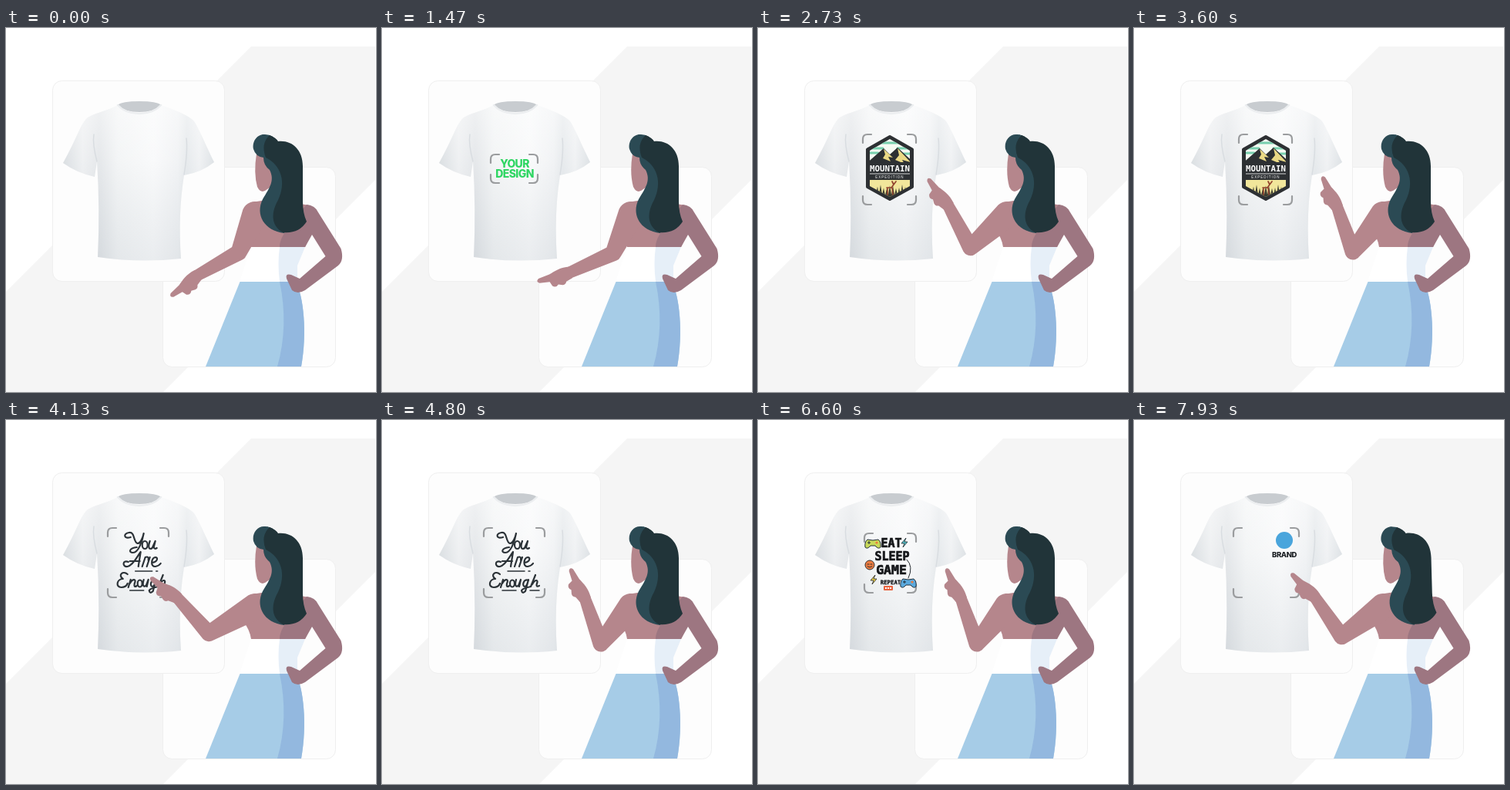
Write an HTML page that moves like this. It is 480 px wide and 472 px high and loops after 8 s.

```html
<!DOCTYPE html>
<html lang="en">
<head>
<meta charset="utf-8">
<title>Shirt designs</title>
<style>
  html, body { margin: 0; width: 100%; height: 100%; overflow: hidden; background: #fff; }
  svg { display: block; }
  text { text-anchor: middle; }
  .card { fill: #fdfdfd; stroke: #efefef; }
  .skin { fill: #b5868c; }
  .shade { fill: #9d7681; }
  .label { font-family: Inter, sans-serif; font-weight: 800; }
  .block { font: 700 15px "DejaVu Sans Mono", monospace; stroke: #15171a; stroke-width: .7; fill: #15171a; }
  .line { fill: none; stroke-linecap: round; stroke-linejoin: round; }
</style>
</head>
<body>
<svg width="480" height="472" viewBox="0 0 480 472">
  <defs>
    <linearGradient id="cloth">
      <stop offset="0" stop-color="#d5dade"/>
      <stop offset=".13" stop-color="#eceef0"/>
      <stop offset=".24" stop-color="#e1e4e7"/>
      <stop offset=".36" stop-color="#f1f3f4"/>
      <stop offset=".6" stop-color="#f8f9fa"/>
      <stop offset=".76" stop-color="#eff1f3"/>
      <stop offset=".82" stop-color="#e3e7ea"/>
      <stop offset=".9" stop-color="#eef0f2"/>
      <stop offset="1" stop-color="#d9dee2"/>
    </linearGradient>
    <linearGradient id="fall" x2="0" y2="1">
      <stop offset="0" stop-color="#fff" stop-opacity=".5"/>
      <stop offset=".35" stop-color="#fff" stop-opacity=".15"/>
      <stop offset="1" stop-color="#8c9aa6" stop-opacity=".13"/>
    </linearGradient>
    <clipPath id="badge"><path d="M171 144 197 159V205L171 219 145 205V159Z"/></clipPath>
    <path id="shirt" d="M145 100C131 108 112 111 105 117C96 126 92 143 74 175Q92 188 115 193L118 173Q122 235 119 297Q173 305 227 299Q223 240 231 191Q254 187 270 174C256 145 250 130 244 121Q236 112 201 100Q173 119 145 100Z"/>
    <g id="pad">
      <path d="M-7 -5Q0 -3 7 -5Q11 -2 10 5Q7 8 3 3H-3Q-7 8 -10 5Q-11 -2 -7 -5Z" stroke="#23303a"/>
      <path d="M-7 -1h4M-5 -3v4" stroke="#23303a"/>
      <circle cx="5" cy="-1" r="1.6" fill="#ee7a3b"/>
    </g>
    <path id="bolt" d="M2 -6 -4 1H0L-2 6 4 -1H0Z" stroke="#1d2226" stroke-width=".8"/>
  </defs>

  <path d="M318 24H479V197L204 472H0V342Z" fill="#f5f5f5"/>
  <rect class="card" x="203.5" y="180.5" width="224" height="259" rx="12"/>
  <rect class="card" x="60.5" y="68.5" width="223" height="260" rx="12"/>

  <use href="#shirt" fill="url(#cloth)"/>
  <use href="#shirt" fill="url(#fall)"/>
  <path d="M145 100Q150 95 173 95T201 100Q192 109 173 109T145 100Z" fill="#c8ccd0"/>
  <path d="M145 100Q155 111 173 111T201 100" class="line" stroke="#eceef0" stroke-width="2.5"/>
  <path d="M118 173Q112 150 114 138M231 190Q236 160 234 143" class="line" stroke="#d9dde1" stroke-width="1.5"/>

  <path id="brackets" class="line" stroke="#9a9c9e" stroke-width="2.2"/>

  <g class="design label" fill="#2fd663" font-size="14" letter-spacing="-.6">
    <text x="172" y="181">YOUR</text><text x="172" y="194">DESIGN</text>
  </g>

  <g class="design">
    <path d="M171 141 200 157.5V206L171 222 142 206V157.5Z" fill="#2d3033" stroke="#2d3033" stroke-width="4" stroke-linejoin="round"/>
    <g clip-path="url(#badge)">
      <path d="M140 140h62v40h-62Z" fill="#f6faf3"/>
      <path d="M160 149h24M146 156h16M181 156h18M142 162h14M186 163h14" class="line" stroke="#78cfae" stroke-width="3"/>
      <path d="M138 178 163 156 171 164 181 155 206 178Z" fill="#2d3033"/>
      <path d="M163 157 175 168 169 167 172 173 162 169 165 164ZM181 156 198 174 187 171 190 176 178 171 183 165Z" fill="#ead985"/>
      <path d="M140 174h62v23h-62Z" fill="#2d3033"/>
      <path d="M140 197h62v26h-62Z" fill="#f1e69b"/>
      <path id="trees" fill="#3a3b30"/>
      <path d="M167 207h7l1 9M168 207v9M173 207l3-4M176 203l-2-4M176 203l3-4" class="line" stroke="#93452f" stroke-width="1.7"/>
    </g>
    <g fill="#fff">
      <text x="171" y="186" font-family="DejaVu Sans Mono, monospace" font-size="10.8" font-weight="700">MOUNTAIN</text>
      <path d="M145 189h52" stroke="#fff" stroke-width=".8"/>
      <text x="171" y="195" font-family="Liberation Sans, sans-serif" font-size="4.5" letter-spacing="1">EXPEDITION</text>
    </g>
  </g>

  <g class="design line" stroke="#2b3237" stroke-width="2.2">
    <path d="M157 152C148 155 147 147 155 146C163 145 160 158 166 160C170 160 173 152 174 147C172 158 167 172 160 172C154 172 155 166 165 165M182 157C179 165 181 169 185 166L189 157 187 165Q188 168 191 166"/>
    <ellipse cx="175.5" cy="162" rx="3.5" ry="5"/>
    <path d="M154 184C146 181 146 191 153 190C161 188 166 176 170 171L167 190M156 183H169M172 190 176 178Q181 176 180 182M178 190 182 178M185 185C192 184 193 178 189 178C184 179 182 190 189 190Q194 189 196 186"/>
    <path d="M153 200C147 195 140 201 147 206C139 206 137 217 145 217Q151 217 153 212M154 217 157 207M156 212C160 205 165 206 162 212Q161 218 165 215M174 207C172 214 173 217 177 215L180 207 178 216M190 208C184 205 181 215 185 216Q188 216 190 207L186 222Q182 226 181 221Q183 218 193 216L199 201M195 213C199 206 203 207 201 212Q199 217 204 215"/>
    <ellipse cx="169" cy="212" rx="3" ry="4.5"/>
    <path d="M163 196h22M190 196h2M156 221h18M192 221h12" stroke-width="1.5"/>
  </g>

  <g class="design">
    <path d="M193 181Q202 190 195 205" class="line" stroke="#252b30"/>
    <use href="#pad" x="149" y="160" fill="#c8d95a"/>
    <use href="#pad" x="195" y="211" fill="#5aa9dd"/>
    <use href="#bolt" x="190" y="159" fill="#55c5cf"/>
    <use href="#bolt" x="150" y="207" fill="#f2d447"/>
    <circle cx="145" cy="188" r="6" fill="#ed7d42" stroke="#31302f"/>
    <path d="M142 187h2M146 187h2M142 190q3 2 6 0" class="line" stroke="#31302f"/>
    <rect x="163" y="215" width="12" height="6" rx="1" fill="#e9633f"/>
    <path d="M165 218h2M168 218h2M171 218h2" stroke="#fff" stroke-width="2"/>
    <g class="block">
      <text x="173" y="165">EAT</text><text x="174" y="182">SLEEP</text>
      <text x="173" y="200" style="font-size:16.5px">GAME</text>
      <text x="172" y="212.5" style="font-size:7.3px;stroke-width:.3px">REPEAT</text>
    </g>
  </g>

  <g class="design label" fill="#1b1f23">
    <circle cx="195" cy="156" r="11" fill="#4aa5dc"/>
    <text x="195" y="178" font-size="9.5" letter-spacing="-.4">BRAND</text>
  </g>

  <path d="M303.500 329H376C386 348 391 395 383 439H259Z" fill="#a6cce7"/>
  <path d="M355 329H376C386 348 391 395 383 439H352Q367 386 355 329Z" fill="#93b8df"/>
  <path d="M318 284H388L378 308V329H303Z" fill="#fff"/>
  <path d="M355 284H388L378 308V329H355Q352 305 355 284Z" fill="#e6eff8"/>
  <path class="skin" d="M307 243Q308 227 325 225L345 222 394 230Q402 240 398 262L388 284H318Q316 271 308 262Z"/>
  <path class="shade" d="M372 250C360 266 355 275 355 284H388L397 268 414.500 296 381 325 370 320Q362 318 364 325L371 340Q378 346 388 340L431 308Q439 301 434.500 286L405 239Q401 230 390 229Z"/>
  <path id="arm" class="skin"/>
  <path id="hand" class="skin"/>

  <path class="skin" d="M325 163Q321 188 326 206Q331 216 339 209L352 200V160Z"/>
  <g id="hair">
    <path d="M336 138C326 137 319 147 321 157Q324 167 334 168Q334 178 342 184C349 198 342 207 333 222C323 242 335 263 361 266L375 200 352 148Q347 138 336 138Z" fill="#2b4a54"/>
    <path d="M337 168Q330 150 342 139Q350 142 353 147C370 145 385 157 385 179V225Q385 240 390 251Q380 267 359 265C342 255 345 237 353 223C364 200 357 178 337 168Z" fill="#213439"/>
  </g>
</svg>
<script>
const LOOP = 8000, SLIDE = 400, TRAVEL = 52;
const swipes = [2040, 3805, 5570, 7335];
const $ = id => document.getElementById(id);
const designs = [...document.querySelectorAll('.design')];

// left, top, right, bottom of the corner brackets for each design
const frames = [
  [141, 164, 202, 201], [136, 138, 205, 229], [132, 140, 211, 230],
  [138, 147, 205, 224], [129, 140, 214, 230]
];

// elbow x, elbow y, forearm angle, hand angle
const pose = {
  hang: [302, 291, 151, 142],
  lift: [300, 292, 156, 165],
  press: [276, 284, 232, 236],
  drag: [262, 276, 228, 215],
  rest: [284, 290, 250.5, 244]
};
const armKeys = [[0, pose.hang], [1470, pose.lift]];
swipes.forEach((s, i) => {
  if (i) armKeys.push([s - 200, pose.rest]);
  armKeys.push([s, pose.press], [s + SLIDE, pose.drag], [s + 900, pose.rest]);
});

const clamp = x => Math.min(1, Math.max(0, x));
const ease = x => (x = clamp(x), x * x * (3 - 2 * x));
const mix = (a, b, p) => a.map((v, i) => v + (b[i] - v) * p);

function sample(keys, t) {
  const i = keys.findIndex(k => k[0] > t);
  if (i < 0) return keys[keys.length - 1][1];
  const [t0, a] = keys[i - 1], [t1, b] = keys[i];
  return mix(a, b, ease((t - t0) / (t1 - t0)));
}

const polar = ([x, y], deg, r) => {
  const a = deg * Math.PI / 180;
  return [x + r * Math.cos(a), y + r * Math.sin(a)];
};

// limb segment with round ends of different radii
function limb(a, ra, b, rb) {
  const deg = Math.atan2(b[1] - a[1], b[0] - a[0]) * 180 / Math.PI;
  return `M${polar(a, deg + 90, ra)}A${ra} ${ra} 0 0 1 ${polar(a, deg - 90, ra)}` +
    `L${polar(b, deg - 90, rb)}A${rb} ${rb} 0 0 1 ${polar(b, deg + 90, rb)}Z`;
}

function drawArm(t) {
  const [x, y, fore, point] = sample(armKeys, t);
  const elbow = [x, y], wrist = polar(elbow, fore, 62);
  $('arm').setAttribute('d', limb([323, 242], 17, elbow, 10.5) + limb(elbow, 10.5, wrist, 7.5));
  $('hand').setAttribute('d', 'M-2 7.5C10 10 18 7 26 4.5L41 3Q46 0 41 -3L28 -5 26 -11Q22 -15 18 -11L13 -13Q9 -14 7 -10L-2 -7.5Z');
  $('hand').setAttribute('transform', `translate(${wrist}) rotate(${point})`);
}

function drawBrackets([l, t, r, b], opacity) {
  const corner = (x, y, sx, sy) =>
    `M${x} ${y + 11 * sy}V${y + 6 * sy}Q${x} ${y} ${x + 6 * sx} ${y}H${x + 11 * sx}`;
  $('brackets').setAttribute('d',
    corner(l, t, 1, 1) + corner(r, t, -1, 1) + corner(l, b, 1, -1) + corner(r, b, -1, -1));
  $('brackets').setAttribute('opacity', opacity);
}

function render(t) {
  const intro = ease((t - 200) / 400);
  const progress = i => i < 0 ? 1 : i < swipes.length ? ease((t - swipes[i]) / SLIDE) : 0;
  let box = frames[0];
  designs.forEach((el, i) => {
    const enter = progress(i - 1), leave = progress(i);
    const opacity = (i ? clamp(enter * 3) : intro) * clamp(1 - 2 * leave);
    el.setAttribute('opacity', opacity);
    el.setAttribute('transform', `translate(${TRAVEL * (1 - enter - leave)})`);
    if (i) box = mix(box, frames[i], ease(enter / 0.48));
  });
  drawBrackets(box, intro);
  drawArm(t);
  $('hair').setAttribute('transform', `rotate(${-1.6 * ease((t - 7000) / 1000)} 350 160)`);
}

let trees = '';
for (let x = 143, i = 0; x < 201; x += 4, i++) {
  const top = 202 + 6 * Math.abs(Math.sin(i * 2.3));
  trees += `M${x} ${top}l3 ${222 - top}h-6Z`;
}
$('trees').setAttribute('d', trees);

const start = performance.now();
(function tick() {
  render((performance.now() - start) % LOOP);
  requestAnimationFrame(tick);
})();
</script>
</body>
</html>
```
